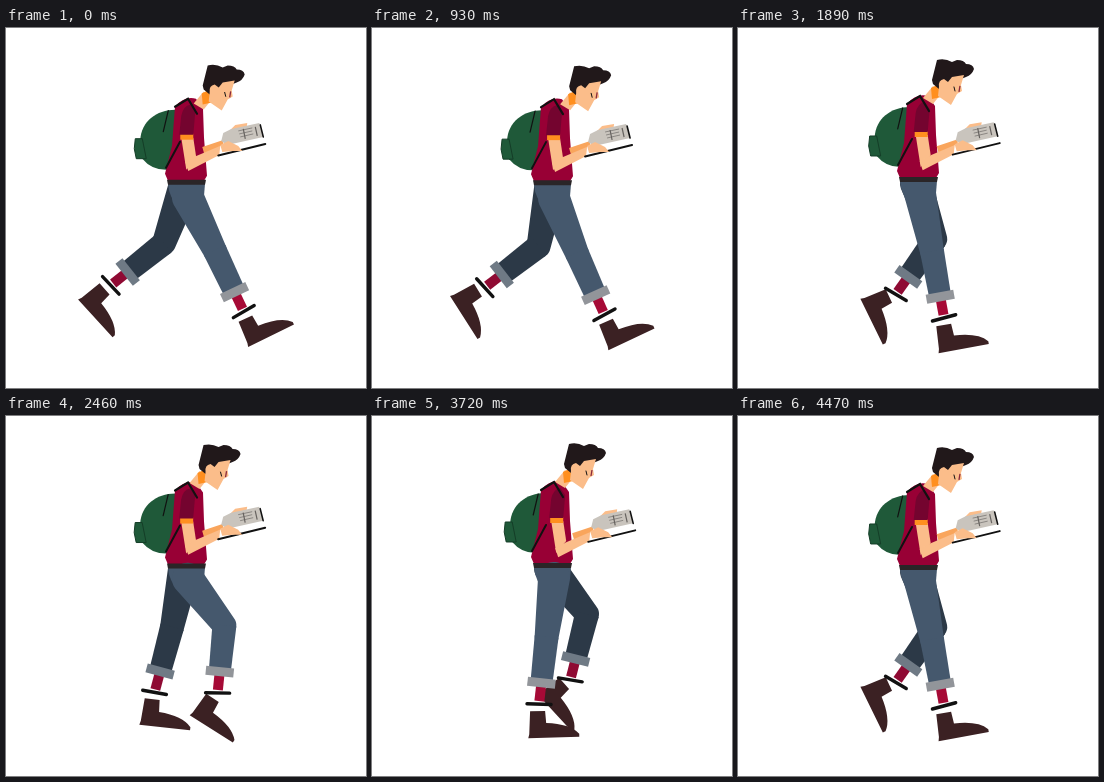
Animation, 360 px wide and 360 px high, one loop 4.5 s. Source, as an HTML page without scripts:

```html
<!DOCTYPE html>
<html lang="en">
<head>
<meta charset="utf-8">
<title>Walking reader</title>
<style>
  @property --strides { syntax: "<number>"; inherits: true; initial-value: 0; }

  html, body { margin: 0; width: 100%; height: 100%; overflow: hidden; background: #fff; }
  svg { display: block; width: 100vw; height: 100vh; animation: walk 4.5s linear infinite; }

  /* One stride takes 0.86 s; the loop cuts back in the middle of a stride */
  @keyframes walk {
    from { --strides: 0; }
    to { --strides: 5.2326; }
  }

  /* Upper body: bobs twice per stride, sways once */
  .walker {
    --angle: calc(var(--strides) * 360deg);
    --bob: calc(2.7px * cos(2 * var(--angle) - 40deg) - 2.4px);
    --sway: calc(2.3px - 2.3px * cos(var(--angle) + 28deg));
    transform: translate(0, var(--bob));
  }
  .head { transform: translate(var(--bob), var(--bob)); }
  .swaying { transform: translate(var(--sway), 0); }
  .reading { transform: translate(0, calc(.8 * var(--sway))); }

  /* Legs: each joint is a sum of three waves, the far leg half a stride later */
  .leg { transform: translate(var(--x), calc(var(--y) + .6 * var(--bob))); }
  .near { --phase: var(--angle); --x: 182px; --y: 170px; --denim: #45586d; --cuff: #92959a; --sock: #a60a36; }
  .far { --phase: calc(var(--angle) + 180deg); --x: 178px; --y: 160px; --denim: #2c3947; --cuff: #6f7a85; --sock: #8f0a33; }
  .hip {
    transform: rotate(calc(-10.6deg - 27.1deg * cos(var(--phase) + 26deg)
      - 7.2deg * cos(2 * var(--phase) + 168deg) - 1.9deg * cos(3 * var(--phase) - 122deg)));
  }
  .knee {
    transform: translate(0, 59px) rotate(calc(22.8deg + 30.4deg * cos(var(--phase) + 108deg)
      + 6.2deg * cos(2 * var(--phase) - 178deg) + 5.7deg * cos(3 * var(--phase) - 168deg)));
  }
  .ankle {
    transform: translate(0, 68px) rotate(calc(8.1deg + 18.2deg * cos(var(--phase) + 76deg)
      + 9.4deg * cos(2 * var(--phase) + 178deg) + 3.2deg * cos(3 * var(--phase) - 145deg)));
  }

  .denim { fill: var(--denim); }
  .cuff { fill: var(--cuff); }
  .sock { fill: var(--sock); }
  .boot { fill: #3b2123; }
  .skin { fill: #fbbd8a; }
  .shade { fill: #ff8f1f; }
  .shirt { fill: #980035; }
  .sleeve { fill: #74042f; }
  .bag { fill: #1f5939; }
  .hair { fill: #21181a; }
  .line { fill: none; stroke: #111; stroke-linecap: round; }
</style>
</head>
<body>
<svg viewBox="0 0 360 360">
  <defs>
    <path id="thigh" class="denim" d="M-16 0A16 16 0 0 1 16 0L12 59A12 12 0 0 1-12 59Z"/>
    <g id="shin">
      <path class="sock" d="M-5 50H5V65H-5Z"/>
      <path class="denim" d="M-12 0H12L11 45H-11Z"/>
      <path class="cuff" d="M-14 42H14V51H-14Z"/>
      <path class="line" stroke-width="3.4" d="M-12 69L12 67"/>
    </g>
    <path id="boot" class="boot" d="M-9 7H6L7 19Q31 20 40 30V33L-11 34L-10 30Z"/>
    <g id="limb" class="hip">
      <use href="#thigh"/>
      <g class="knee">
        <use class="ankle" href="#boot"/>
        <use href="#shin"/>
      </g>
    </g>
  </defs>

  <g class="walker">
    <g class="leg far"><use href="#limb"/></g>

    <g class="swaying">
      <path class="bag" d="M169 82C150 82 135 94 134 112L136 131Q146 143 162 142L176 118V84Z"/>
      <path class="bag" stroke="#143d27" d="M129 111H136L140 131H130L128 121Z"/>
      <path class="line" stroke-width="1.2" d="M162 83L157 104"/>
    </g>

    <path class="shirt" d="M169 79Q178 68 190 71L197 81L198 110L201 148L198 153H162L159 146L166 118Z"/>
    <path class="line" stroke-width="2" d="M174 114L160 140"/>

    <path fill="#45586d" d="M162 156H199L198 168L174 178Q163 172 162 156Z"/>
    <g class="leg near"><use href="#limb"/></g>
    <path fill="#2a2527" d="M161 152H200L199 157H162Z"/>

    <g class="head">
      <path class="skin" d="M188 76L198 64L206 72L198 82Z"/>
      <path class="shade" d="M196 66L204 62L206 75L197 77Z"/>
      <path class="hair" d="M197 58L202 38Q210 36 217 40L222 38Q229 38 231 42Q238 42 239 47Q237 53 231 55L209 64L204 67L198 62Z"/>
      <path class="skin" d="M204 65Q203 58 209 57L213 60L217 55L229 53L226 63L227 69L222 72L216 83L203 74Z"/>
      <path class="line" stroke-width="1" d="M219 65L220 69"/>
      <path d="M225 64L224 70" stroke="#8a2a3c" stroke-width="1.3"/>
    </g>

    <g class="swaying">
      <path class="skin" d="M175 110H187L190 130L180 142Z"/>
      <path class="shade" d="M174 106H187V112H174Z"/>
      <path class="sleeve" d="M173 107L175 88Q177 78 184 77L189 84L187 107Z"/>
      <g class="reading">
        <path fill="#f9a55c" d="M196 119L217 112V118L198 126Z"/>
        <path class="skin" d="M179 134L190 128L216 117L219 124L182 143Z"/>
        <path class="skin" d="M222 104L229 97L241 95L240 102Z"/>
        <path fill="#fff" d="M214 118L256 107L258 117L213 127Z"/>
        <path class="line" stroke-width="2" d="M212 127.5L259 116"/>
        <path fill="#c9c4bd" d="M215 113L217 105L225 101L253 95L257 109L221 117Z"/>
        <path class="line" stroke-width="1.6" d="M254 97L257 109"/>
        <path fill="none" stroke="#8b8783" stroke-width="1" d="M232 103L246 100M233 106L246 103M234 109L247 106"/>
        <path fill="none" stroke="#66625f" stroke-width="1.2" d="M237 101L239 111M249 99L251 108"/>
        <path class="skin" d="M214 117L222 113L232 118L236 123L227 123L216 124Z"/>
      </g>
    </g>
    <path class="line" stroke-width="2.2" d="M169 79L182 71L191 86"/>
  </g>
</svg>
</body>
</html>
```
